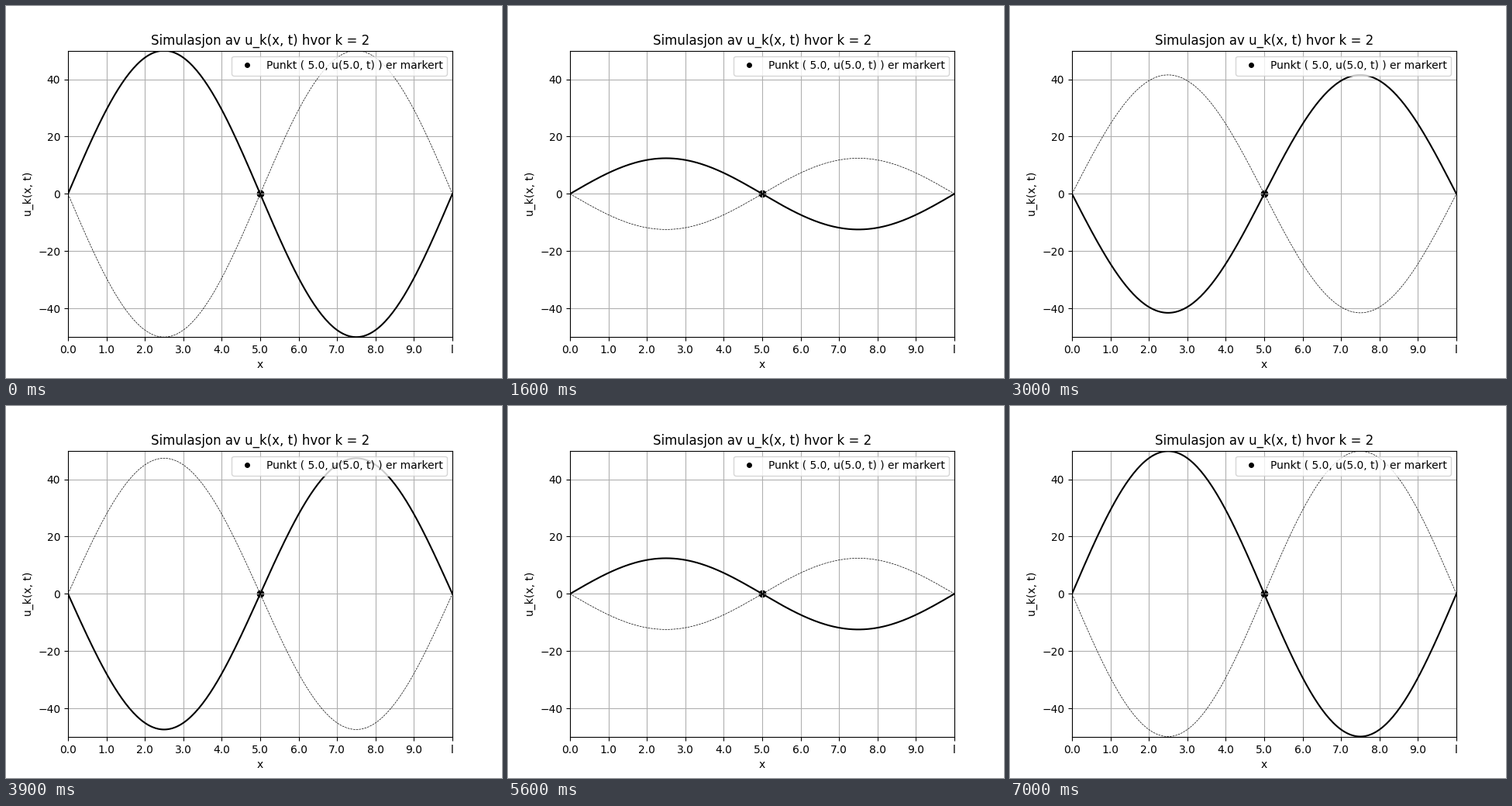
Write a matplotlib script that moves like this. It is 640 px wide and 480 px high and loops after 7.1 s.

```python
import numpy as np
import matplotlib.pyplot as plt
from matplotlib.animation import FuncAnimation

LENGTH = 10.0
AMPLITUDE = 50
K = 2
DT = 0.14
TURN = 35        # steps until the motion runs backwards
FRAMES = 2 * TURN + 1
MARK_X = 5.0

plt.rcParams["font.family"] = "DejaVu Sans"


def wave(x, t):
    w = K * np.pi / LENGTH
    return AMPLITUDE * np.cos(w * t) * np.sin(w * x)


def time_at(frame):
    """The starting pose is held for two frames, then time runs out and back."""
    step = max(frame - 1, 0)
    return DT * (TURN - abs(step - TURN))


x = np.linspace(0, LENGTH, 201)

fig, ax = plt.subplots(figsize=(6.4, 4.8), dpi=100)
ax.set_xlim(0, LENGTH)
ax.set_ylim(-AMPLITUDE, AMPLITUDE)
ticks = np.arange(0, LENGTH + 1)
ax.set_xticks(ticks, [f"{v:.1f}" for v in ticks[:-1]] + ["l"])
ax.set_yticks(range(-40, 41, 20))
ax.grid(True)
ax.set_title(f"Simulasjon av u_k(x, t) hvor k = {K}")
ax.set_xlabel("x")
ax.set_ylabel("u_k(x, t)")

string, = ax.plot([], [], "k-", lw=1.5)
mirror, = ax.plot([], [], "k--", lw=0.5)
point = ax.scatter([MARK_X], [0], color="black")
ax.plot([], [], "ko", markersize=4,
        label=f"Punkt ( {MARK_X}, u({MARK_X}, t) ) er markert")
ax.legend(loc="upper right")


def update(frame):
    t = time_at(frame)
    u = wave(x, t)
    string.set_data(x, u)
    mirror.set_data(x, -u)
    point.set_offsets([[MARK_X, wave(MARK_X, t)]])
    return string, mirror, point


anim = FuncAnimation(fig, update, frames=FRAMES, interval=100,
                     repeat=True, repeat_delay=0)
plt.show()
```
